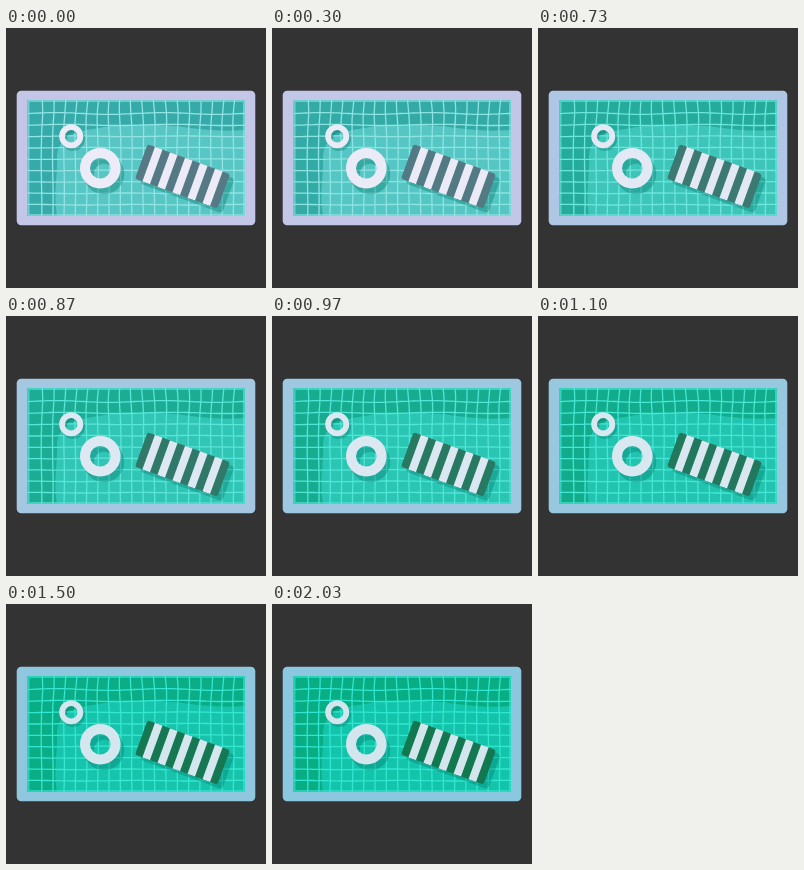
An HTML page for the animation above (4.01 s loop, 260 by 260 pixels).

```html
<!DOCTYPE html>
<html lang="en">
<head>
<meta charset="utf-8">
<title>Pool</title>
<style>
@property --rim { syntax: "<color>"; inherits: true; initial-value: #c4c6e7; }
@property --water { syntax: "<color>"; inherits: true; initial-value: #58c6c4; }
@property --shade { syntax: "<color>"; inherits: true; initial-value: #36aaa8; }
@property --tile { syntax: "<color>"; inherits: true; initial-value: #90e4e2; }
@property --stripe { syntax: "<color>"; inherits: true; initial-value: #557a86; }
@property --pale { syntax: "<color>"; inherits: true; initial-value: #ecebf7; }

html, body { margin: 0; width: 100%; height: 100%; overflow: hidden; background: #333; }
svg { display: block; width: 100%; height: 100%; animation: tint 4010ms infinite; }

@keyframes tint {
  0% {
    --rim: #c4c6e7; --water: #58c6c4; --shade: #36aaa8; --tile: #90e4e2; --stripe: #557a86; --pale: #ecebf7;
    animation-timing-function: cubic-bezier(.5, 0, .25, 1);
  }
  50.6%, 100% {
    --rim: #8bc7de; --water: #13c4aa; --shade: #08ad84; --tile: #30e6d0; --stripe: #127850; --pale: #d3e6ee;
  }
}

.rim { fill: var(--rim); }
.water { fill: var(--water); }
.shade { fill: var(--shade); }
.tiles { fill: none; stroke: var(--tile); stroke-width: 1.3; }
.edge { fill: none; stroke: var(--tile); stroke-width: 2; opacity: .65; }
.stripe { fill: var(--stripe); }
.pale { fill: var(--pale); }
.ring { fill: none; stroke: var(--pale); }
.cast { stroke: #007468; fill: none; opacity: .35; }
.mat-cast { fill: #007468; opacity: .35; }
</style>
</head>
<body>
<svg viewBox="0 0 260 260">
  <clipPath id="basin"><rect x="21.5" y="72" width="217.5" height="116"/></clipPath>
  <clipPath id="mat"><rect x="-44" y="-18.5" width="88" height="37" rx="3"/></clipPath>

  <rect class="rim" x="10.7" y="62.7" width="238.6" height="134.6" rx="4.5"/>
  <g clip-path="url(#basin)">
    <rect class="shade" x="21" y="72" width="218" height="116"/>
    <path class="water" d="M51 188C47 166 52 146 51 128C52 111 67 104 87 101C112 95 145 96 169 98C193 101 211 104 239 102V188Z"/>
    <path class="tiles" id="tiles"/>
    <rect class="edge" x="22.5" y="73" width="215.5" height="114"/>
    <circle class="cast" cx="67" cy="111" r="9.1" stroke-width="5.8"/>
    <circle class="cast" cx="98" cy="146" r="15.3" stroke-width="10"/>
    <rect class="mat-cast" x="-44" y="-18.5" width="88" height="37" rx="4" transform="translate(181 153) rotate(20)"/>
  </g>

  <circle class="ring" cx="65.2" cy="108.3" r="9.1" stroke-width="5.8"/>
  <circle class="ring" cx="94.3" cy="140.2" r="15.3" stroke-width="10"/>

  <g transform="translate(176.5 148.4) rotate(20)">
    <g clip-path="url(#mat)" id="stripes">
      <rect class="stripe" x="-44" y="-18.5" width="88" height="37"/>
    </g>
  </g>
</svg>
<script>
const range = (n, make) => Array.from({ length: n }, (_, i) => make(i));
const line = points => "M" + points.map(p => p.map(v => v.toFixed(1)).join(" ")).join("L");

// Bends a tile corner; the upper part of the water ripples most.
function ripple(x, y) {
  const lift = Math.max(0, (112 - y) / 40);
  return [
    x + (0.3 + 1.3 * lift) * Math.sin(x / 23 + y / 14),
    y + (0.3 + 0.9 * lift) * Math.sin(x / 17 - y / 19)
  ];
}

const columns = range(18, i => line(range(30, k => ripple(35.5 + i * 11.3, 72 + k * 4))));
const rows = range(9, i => line(range(56, k => ripple(21 + k * 4, 85.5 + i * 11.4))));
document.getElementById("tiles").setAttribute("d", columns.concat(rows).join(""));

const band = 88 / 11;
document.getElementById("stripes").insertAdjacentHTML("beforeend",
  range(5, i => `<rect class="pale" x="${-44 + band * (2 * i + 1)}" y="-18.5" width="${band}" height="37"/>`).join(""));
</script>
</body>
</html>
```
